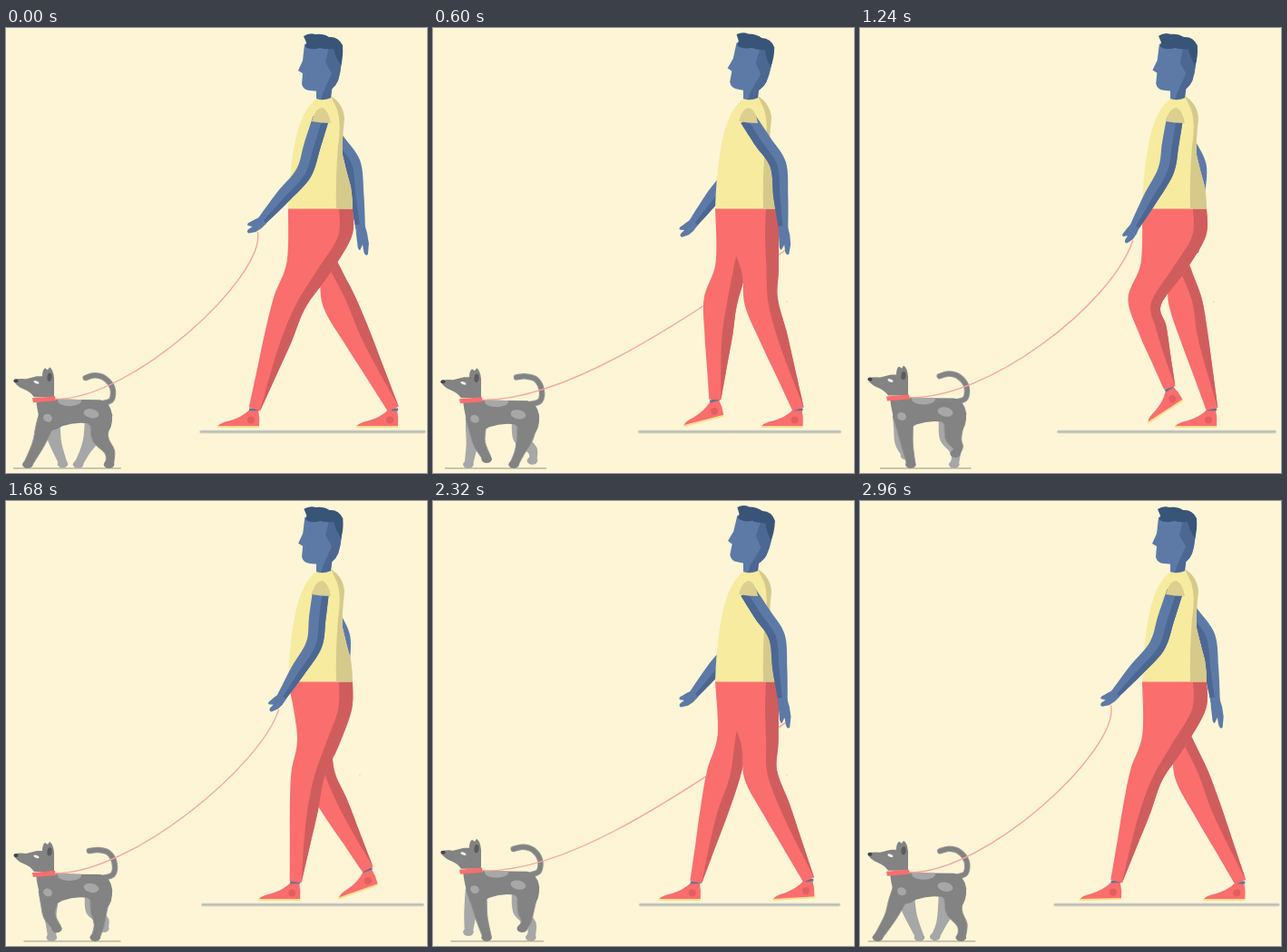
Recreate the animation shown at these times as an HTML page with a canvas. Size 464 px wide and 491 px high, loop 3 s.

```html
<!DOCTYPE html>
<html lang="en">
<head>
<meta charset="utf-8">
<title>Dog walk</title>
<style>
  html, body { margin: 0; width: 100%; height: 100%; overflow: hidden; background: #fdf5d6; }
  canvas { display: block; width: 464px; height: 491px; }
</style>
</head>
<body>
<canvas id="stage"></canvas>
<script>
const W = 464, H = 491, LOOP = 3000, TICK = 40, STRIDE = 1500, TROT = 1000;
const C = {
  bg: '#fdf5d6', red: '#fa6e6e', redDark: '#d05d5d', sole: '#fadf8c', sock: '#66708f',
  shirt: '#f7eba0', shirtDark: '#d5ca8c', sleeve: '#dccf90',
  skin: '#5d7aa7', skinDark: '#4c6792', hair: '#385578',
  dog: '#838383', dogLight: '#a7a7a7', dogEdge: '#969696', ear: '#5c5c5c', nose: '#454545'
};

const canvas = document.getElementById('stage');
const ctx = canvas.getContext('2d');
const dpr = window.devicePixelRatio || 1;
canvas.width = W * dpr;
canvas.height = H * dpr;

const mix = (a, b, t) => a + (b - a) * t;
const mid = (a, b, t = .5) => [mix(a[0], b[0], t), mix(a[1], b[1], t)];
const wrap = p => (p + 1) % 1;
const cos = p => Math.cos(2 * Math.PI * p);
const sin = p => Math.sin(2 * Math.PI * p);

// First half of the phase: foot on the ground, moving back. Second half: it swings forward.
function step(phase, ahead, behind, sway) {
  const swing = phase >= .5, s = phase * 2 % 1;
  const arc = Math.sin(Math.PI * s) ** 2;
  const x = (swing ? mix(behind, ahead, s) : mix(ahead, behind, s)) + sway * arc;
  return { x, lift: swing ? arc : 0, trail: swing ? 1 - s : s };
}

// Adds a smooth open curve to the path.
function curve(path, pts, join) {
  path[join ? 'lineTo' : 'moveTo'](...pts[0]);
  for (let i = 0; i < pts.length - 1; i++) {
    const p0 = pts[i - 1] || pts[i], p1 = pts[i], p2 = pts[i + 1], p3 = pts[i + 2] || p2;
    path.bezierCurveTo(
      p1[0] + (p2[0] - p0[0]) / 6, p1[1] + (p2[1] - p0[1]) / 6,
      p2[0] - (p3[0] - p1[0]) / 6, p2[1] - (p3[1] - p1[1]) / 6, ...p2);
  }
}
function band(left, right, color) {
  const path = new Path2D();
  curve(path, left);
  curve(path, right.slice().reverse(), true);
  path.closePath();
  ctx.fillStyle = color;
  ctx.fill(path);
  return path;
}
function fill(d, color) {
  ctx.fillStyle = color;
  ctx.fill(new Path2D(d));
}
function oval(x, y, rx, ry, color, turn = 0) {
  ctx.fillStyle = color;
  ctx.beginPath();
  ctx.ellipse(x, y, rx, ry, turn, 0, 7);
  ctx.fill();
}
function stroke(path, color, width) {
  ctx.strokeStyle = color;
  ctx.lineWidth = width;
  ctx.stroke(path);
}

// Points beside a bone chain of [x, y, half width]; +1 is the back edge.
function edge(bones, offs) {
  return bones.map((b, i) => {
    const p = bones[i - 1] || b, q = bones[i + 1] || b;
    const dx = q[0] - p[0], dy = q[1] - p[1], len = Math.hypot(dx, dy) || 1;
    const o = (Array.isArray(offs) ? offs[i] : offs) * b[2];
    return [b[0] + dy / len * o, b[1] - dx / len * o];
  });
}

function foot(x, y, angle) {
  ctx.save();
  ctx.translate(x, y);
  ctx.rotate(angle * Math.PI / 180);
  fill('M-41 17.5 L5 17.5 L5 20.5 L-41 20.5Z', C.sole);
  fill('M-6 1 L4 1 Q6 10 5 18.5 L-40 18.5 Q-38 15 -28 13 Q-14 9 -6 1Z', C.red);
  oval(-4, 12, 4, 4, '#e35f5f');
  fill('M-6 -1 L5 -1 L5 1.8 L-6 1.8Z', C.sock);
  ctx.restore();
}

function leg(phase, seat) {
  const { x, lift, trail } = step(phase, 274, 427, 18);
  const ankle = [x, 420.5 - 30 * lift, 6.5];
  const bend = 36 * lift + 16 * trail ** 2;
  const knee = [mix(346, x, .46) - bend, 302, 18.5];
  const bones = [[346, 210, 30], knee, [...mid(knee, ankle, .33), 15.5], [...mid(knee, ankle, .66), 11], ankle];
  const front = edge(bones, -1).slice(1), back = edge(bones, 1).slice(1);
  const inner = edge(bones, [0, .4, .25, .4, 1]).slice(1);
  const top = [311, 199], tuck = [seat - 16, 230];
  const thigh = mid(top, front[0], .6);
  thigh[0] += 8;
  const rear = [[seat, 199], [seat - 1, 230], mid([seat, 236], back[0]), ...back];
  foot(ankle[0], ankle[1], -42 * lift);
  band([top, thigh, ...front], rear, C.red);
  band([[seat - 15, 199], tuck, mid(tuck, inner[0]), ...inner], rear, C.redDark);
}

function armPose(phase) {
  const c = cos(phase), s = sin(phase);
  const elbow = [355 - 27 * c + 6 * s, 155 + 5 * c];
  const wrist = [336 - 55 * c + 10 * s, 221 - 4 * c - 3 * cos(2 * phase)];
  const tip = [wrist[0] - 5 - 10 * c, wrist[1] + 19 - 9 * c];
  return { elbow, wrist, tip };
}

function arm(phase) {
  const { elbow, wrist, tip } = armPose(phase);
  const top = [347, 100, 9];
  const bones = [top, [...mid(top, elbow), 9.3], [...elbow, 9], [...mid(elbow, wrist), 8], [...wrist, 5]];
  const u = Math.max(0, Math.min(1, (tip[0] - 330) / 45));
  band(edge(bones, -1), edge(bones, 1), C.skin);
  band(edge(bones, mix(.2, -1, u)), edge(bones, mix(1, -.1, u)), C.skinDark);
  const dx = tip[0] - wrist[0], dy = tip[1] - wrist[1];
  ctx.save();
  ctx.translate(...wrist);
  ctx.rotate(Math.atan2(dy, dx));
  ctx.scale(Math.hypot(dx, dy) / 20, 1);
  fill('M-4 -4.8 Q4 -7 12 -6 L20 -3 Q22 0 18 1 L12 1 L16 5 Q15 7.5 11 6.5 L4 6 L-4 4.8Z', C.skin);
  ctx.restore();
}

function leash(phase, collarY) {
  const { wrist, tip } = armPose(phase), [x, y] = mid(wrist, tip);
  const pullX = 268 + 18 * cos(phase), pullY = 317 - 33 * cos(phase) - 9 * cos(2 * phase);
  stroke(new Path2D(`M${x + 4} ${y + 6} C${pullX} ${pullY} 138 411 54 ${collarY}`), '#fba39a', 1.3);
}

function head(tilt) {
  fill('M342 64 L359 62 L358 77 Q350 81 342 78Z', C.skin);
  fill('M350 70 L360 62 L358 77 L347 79Z', C.skinDark);
  ctx.save();
  ctx.translate(350, 72);
  ctx.rotate(tilt * Math.PI / 180);
  ctx.translate(-350, -72);
  fill('M329 18 L327 36 L322 47 L327 50 L326 62 Q328 69 335 69 L347 70 Q360 71 366 58 Q371 42 370 20 L350 12Z', C.skin);
  fill('M356 20 L352 38 L359 50 L350 70 Q361 70 366 58 Q371 42 370 18Z', C.skinDark);
  fill('M328 9 Q334 5 341 7 Q350 6 356 10 Q366 9 371 19 Q372 32 369 41 Q363 32 361 23 Q352 24 346 22 Q337 25 330 21 L331 16Z', C.hair);
  ctx.restore();
}

function torso() {
  const back = 'M358 75 Q372 84 373 100 Q370 125 371 140 Q375 158 380 175 Q382 188 382 199.5';
  fill(back + ' L311 199.5 Q312 165 316 140 Q320 112 328 96 Q334 84 342 78 Q350 81 358 75Z', C.shirt);
  fill(back + ' L364 199.5 Q363 165 366 130 Q370 105 365 90Z', C.shirtDark);
}

function groundLine(x1, x2) {
  ctx.save();
  ctx.lineCap = 'round';
  const line = new Path2D(`M${x1 + 1} 445.5 L${x2 - 1} 445.5`);
  stroke(line, 'rgba(185,188,184,.45)', 4);
  stroke(line, '#b9bbb7', 2.2);
  ctx.restore();
}

function dogLimb(bones, color) {
  const [x, y] = bones[bones.length - 1];
  const shape = band(edge(bones, -1), edge(bones, 1), color);
  if (color === C.dog) stroke(shape, C.dogEdge, 1);
  oval(x - .5, y + .5, 5.8, 4.4, color);
}
function frontLeg(phase, x, bob, color) {
  const { x: px, lift } = step(wrap(phase + .04), 20, 66, 11);
  const knee = [mix(x, px, .52) - 4 * lift, 460 - 2 * lift, 6.5];
  dogLimb([[x, 430 + bob, 11], [mix(x, knee[0], .5), 445 + bob, 9], knee, [px, 481 - 10 * lift, 4.6]], color);
}
function hindLeg(phase, x, bob, color) {
  const { x: px, lift } = step(wrap(phase + .5), 80, 114, 8);
  const knee = [x - 3 + .1 * (px - 97), 452, 9];
  const hock = [mix(knee[0], px, .75) + 3, 468 - 5 * lift, 5.5];
  dogLimb([[x, 428 + bob, 12], knee, hock, [px, 481 - 12 * lift, 4.6]], color);
}

function dog(phase) {
  const bob = -1.7 - 1.8 * sin(phase), wag = .5 + .5 * cos(phase - .62);
  const other = wrap(phase + .5);
  stroke(new Path2D(`M${15 - 7 * cos(2 * phase)} 485.7 L${125 + 3 * cos(phase - .85)} 485.7`), '#bdb3a6', 1.4);
  frontLeg(other, 47, bob, C.dogLight);
  hindLeg(other, 99, bob, C.dogLight);
  hindLeg(phase, 105, bob, C.dog);
  frontLeg(phase, 47, bob, C.dog);

  ctx.save();
  ctx.translate(0, bob);
  ctx.lineCap = 'round';
  const lean = 5 * wag, tail = new Path2D();
  curve(tail, [[106, 416], [116 + lean * .4, 412], [117 + lean * .5, 399],
    [108 + lean, 388], [97 + lean, 385], [87 + lean, 388 - lean * .4]]);
  stroke(tail, C.dogEdge, 6.5);
  stroke(tail, C.dog, 4.5);

  const body = new Path2D('M33 412 L55 411 Q80 412 104 412 Q115 415 117 428 Q118 444 110 450 Q98 446 90 438 Q76 436 62 441 Q52 448 41 445 Q35 430 33 412Z');
  ctx.fillStyle = C.dog;
  ctx.fill(body);
  ctx.save();
  ctx.clip(body);
  oval(70, 413, 13, 6, C.dogLight);
  oval(46, 432, 5, 4.3, C.dogLight, .4);
  oval(94, 427, 8.5, 5, C.dogLight, .2);
  ctx.restore();

  fill('M9 390 Q14 388 22 389 L34 386 L40 386 Q40 379 43 377 L46 379 L48 376 Q52 378 53 388 L53 409 L31 409 Q27 403 19 400 Q12 397 9 392Z', C.dog);
  oval(11, 391, 2.6, 2, C.nose);
  oval(48, 387, 2.6, 4.6, C.ear, .1);
  oval(33.5, 392.5, 3.2, 1.5, '#f4f4f4', .35);
  fill('M29 410 L54 408 L55 413 L30 415Z', C.red);
  ctx.restore();
  return 411 + bob;
}

function draw(t) {
  const near = t % STRIDE / STRIDE, far = wrap(near + .5);
  ctx.setTransform(dpr, 0, 0, dpr, 0, 0);
  ctx.fillStyle = C.bg;
  ctx.fillRect(0, 0, W, H);

  const reach = 7 * cos(near);
  groundLine(221 - reach, 455 + reach);
  const collarY = dog(t % TROT / TROT);
  leash(near, collarY);
  arm(far);
  leg(far, 354);
  leg(near, 382);
  torso();
  head(6.8 * Math.sin(Math.PI * near) ** 3);
  arm(near);
  fill('M337 103 Q341 88 349 88 Q356 92 358 105 Q347 105 337 103Z', C.sleeve);
  oval(390, 302, .8, .8, '#f6c3b0');
}

const start = performance.now();
function tick() {
  const t = Math.max(0, performance.now() - start) % LOOP;
  draw(Math.floor(t / TICK) * TICK);
  requestAnimationFrame(tick);
}
tick();
</script>
</body>
</html>
```
